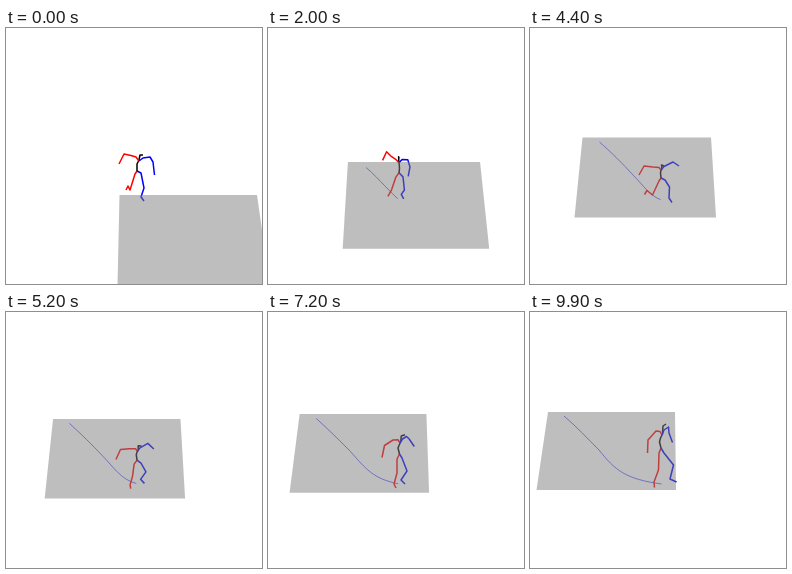
An HTML page without scripts for the animation above (10 s loop, 256x256 px).

```html
<!DOCTYPE html>
<html lang="en">
<head>
<meta charset="utf-8">
<title>Walking figure</title>
<style>
html, body { margin: 0; width: 100%; height: 100%; overflow: hidden; background: #fff; }
svg { display: block; width: 100%; height: 100%; }
path { fill: none; stroke-width: 1.5; stroke-linejoin: round; animation: 10s infinite; }
.right { stroke: #f00; }
.left { stroke: #00f; }
.spine { stroke: #000; animation-name: spine; }
.leg.right { animation-name: legR; }
.leg.left { animation-name: legL; }
.arm.right { animation-name: armR; }
.arm.left { animation-name: armL; }
.trail { stroke: #00f; stroke-width: .6; animation-name: trail; }
.floor { fill: #7e7e7e; fill-opacity: .5; animation-name: floor; }

/* Each key moves on in 100 ms steps up to the next one. */
@keyframes floor {
  0% { d: path("M113.5 167L251 167L264 258L111.5 258Z"); animation-timing-function: steps(11); }
  11% { d: path("M93 148L228 148L238 237L89 237Z"); animation-timing-function: steps(11); }
  22% { d: path("M77 131L208.5 131L217.5 217L71.5 217Z"); animation-timing-function: steps(8); }
  30% { d: path("M67.5 121L197.5 121L204 203L60.5 203Z"); animation-timing-function: steps(3); }
  33% { d: path("M63.5 117.5L193 117.5L199 199L56.5 199Z"); animation-timing-function: steps(11); }
  44% { d: path("M52.5 109.5L181 109.5L186 189.5L44.5 189.5Z"); animation-timing-function: steps(11); }
  55% { d: path("M45 106L172 106L176.5 185.5L36.5 185.5Z"); animation-timing-function: steps(6); }
  61% { d: path("M40.5 104.5L167 104.5L171 183.5L31 183.5Z"); animation-timing-function: steps(5); }
  66% { d: path("M36 103L162.5 103L166 182L26.5 182Z"); animation-timing-function: steps(11); }
  77% { d: path("M28 101L155 101L157 179.5L17.5 179.5Z"); animation-timing-function: steps(6); }
  83% { d: path("M24 100.5L151 100.5L153 178.5L13 178.5Z"); animation-timing-function: steps(5); }
  88% { d: path("M22 100L149 100L150.5 178L11 178Z"); animation-timing-function: steps(11); }
  99%, 100% { d: path("M18 100L145 100L146 178L6.5 178Z"); }
}
@keyframes trail {
  0% { d: path("M131 171.5C131 171.5 131 171.5 131 171.5C131 171.5 131 171.5 131 171.5"); animation-timing-function: steps(11); }
  11% { d: path("M110.5 152.5C114 155 118 160 121 162C124 165 126 168 129.5 170.5"); animation-timing-function: steps(19); }
  30% { d: path("M84 125C95 134 105 145 112 153C118 159 124 165 130 171"); animation-timing-function: steps(14); }
  44% { d: path("M69.5 114C80 123 93 136 103 147C113 157 120 168 130.5 171.5"); animation-timing-function: steps(17); }
  61% { d: path("M56.5 108.5C68 119 79 130 90 141C103 155 110 167 130 171.5"); animation-timing-function: steps(22); }
  83% { d: path("M40 104.5C52 115 63 126 75 138C92 158 100 166.5 130.5 172"); animation-timing-function: steps(16); }
  99%, 100% { d: path("M34 104C46 114 58 127 69 138C85 158 95 167 131.5 172"); }
}
@keyframes spine {
  0% { d: path("M131 143L131 139L131 136L133 132L134 127L137 127"); animation-timing-function: steps(11); }
  11% { d: path("M131 141L131.5 137L132 133L132 130L133 124L134 124.5"); animation-timing-function: steps(19); }
  30% { d: path("M131 149L131.5 145L130.5 141L129.5 138L128 134L128 137"); animation-timing-function: steps(14); }
  44% { d: path("M131 150L130.5 145L131 142L132 141L131.5 137L134 138"); animation-timing-function: steps(17); }
  61% { d: path("M131 146L130 140L131 138L132.5 135L133 130L137 129.5"); animation-timing-function: steps(22); }
  83% { d: path("M132 138L130 132L131 129L133 124L133.5 118L137 116"); animation-timing-function: steps(16); }
  99%, 100% { d: path("M131 136L129.5 130L130.5 126L132.5 122L133 114L136 112"); }
}
@keyframes armR {
  0% { d: path("M133 133L130 129L125 127.5L118 126L113 136"); animation-timing-function: steps(11); }
  11% { d: path("M132 131L130 127L126 124L120 120L116 129"); animation-timing-function: steps(19); }
  30% { d: path("M130 139L125 136L121 134L117 128L113 136"); animation-timing-function: steps(14); }
  44% { d: path("M131 142L129 139.5L123 139L114 138L109 147"); animation-timing-function: steps(17); }
  61% { d: path("M132 136L130 133.5L124 134L115 137L111 148"); animation-timing-function: steps(22); }
  83% { d: path("M132 126L130 122L126 122L118 130L117 143"); animation-timing-function: steps(16); }
  99%, 100% { d: path("M132 123L130 119.5L126 119L118 128L117.5 141"); }
}
@keyframes armL {
  0% { d: path("M133 133L137 130L144 129L147 134L148.5 147"); animation-timing-function: steps(11); }
  11% { d: path("M132 131L135 128L141.5 129L141 139L135 148"); animation-timing-function: steps(19); }
  30% { d: path("M130 139L133 135.5L138 135L143 139L146 149"); animation-timing-function: steps(14); }
  44% { d: path("M131 142L134 138.5L138 136.5L143 134L149 138"); animation-timing-function: steps(17); }
  61% { d: path("M132 136L134 133L137 131L140.5 128.5L146.5 136"); animation-timing-function: steps(22); }
  83% { d: path("M132 126L135 121L140 118L141.5 125L146 133"); animation-timing-function: steps(16); }
  99%, 100% { d: path("M132 123L134 118L138.5 115L139 121L142.5 130.5"); }
}
@keyframes legR {
  0% { d: path("M131 143L129 146L124 162L122 158L120 162"); animation-timing-function: steps(11); }
  11% { d: path("M131 141L128 145L127 160L127 172L125 177.5"); animation-timing-function: steps(6); }
  17% { d: path("M131 143.5L128 148L121 161L119 157L116 161"); animation-timing-function: steps(7); }
  24% { d: path("M131 146.5L128 150L127 163L127 173L125 178"); animation-timing-function: steps(6); }
  30% { d: path("M131 149L128 153L119 162.5L118 158.5L114 161.5"); animation-timing-function: steps(7); }
  37% { d: path("M131 149.5L128 153L127 165L125 174L126 178"); animation-timing-function: steps(7); }
  44% { d: path("M131 150L129 153L122.5 167L117 162.5L114.5 166.5"); animation-timing-function: steps(9); }
  53% { d: path("M131 148L128 152L127 164L125 174L126 178"); animation-timing-function: steps(8); }
  61% { d: path("M131 146L129 150L123 165L115 163L114 167"); animation-timing-function: steps(11); }
  72% { d: path("M131.5 142L129 147L129 161L126 172L128 176"); animation-timing-function: steps(11); }
  83% { d: path("M132 138L129 143L128 159L122 169L122 174"); animation-timing-function: steps(8); }
  91% { d: path("M131.5 137L129 142L130 158L127 171L130 175"); animation-timing-function: steps(8); }
  99%, 100% { d: path("M131 136L129 141L128.5 158L124 170L124.5 175.5"); }
}
@keyframes legL {
  0% { d: path("M131 143L135 145L138 160L135 169L138 173"); animation-timing-function: steps(11); }
  11% { d: path("M131 141L135 147L137 160L130 156.5L133 161.5"); animation-timing-function: steps(6); }
  17% { d: path("M131 143.5L135 148L136 162L135 172L137 176"); animation-timing-function: steps(7); }
  24% { d: path("M131 146.5L135 150L137 162L131 159L134 164"); animation-timing-function: steps(6); }
  30% { d: path("M131 149L135 151L134 165L135 175L136 179"); animation-timing-function: steps(7); }
  37% { d: path("M131 149.5L135 152L138 162L133 166L136 170"); animation-timing-function: steps(7); }
  44% { d: path("M131 150L135 152L139.5 159L139 170L142 174.5"); animation-timing-function: steps(9); }
  53% { d: path("M131 148L135 151L140 160L134 167L138 171"); animation-timing-function: steps(8); }
  61% { d: path("M131 146L134 148L144 155L143.5 171L148 174"); animation-timing-function: steps(11); }
  72% { d: path("M131.5 142L134 146L139 159L133 168L137 172"); animation-timing-function: steps(11); }
  83% { d: path("M132 138L135 142L144.5 154L142 168L147 172.5"); animation-timing-function: steps(8); }
  91% { d: path("M131.5 137L134 141L139 156L132 167L136 171"); animation-timing-function: steps(8); }
  99%, 100% { d: path("M131 136L134 141L143.5 153L140 167L146.5 170"); }
}
</style>
</head>
<body>
<svg viewBox="0 0 256 256">
  <path class="trail"/>
  <path class="leg right"/>
  <path class="leg left"/>
  <path class="spine"/>
  <path class="arm right"/>
  <path class="arm left"/>
  <!-- the translucent floor tints whatever lies under it -->
  <path class="floor"/>
</svg>
</body>
</html>
```
